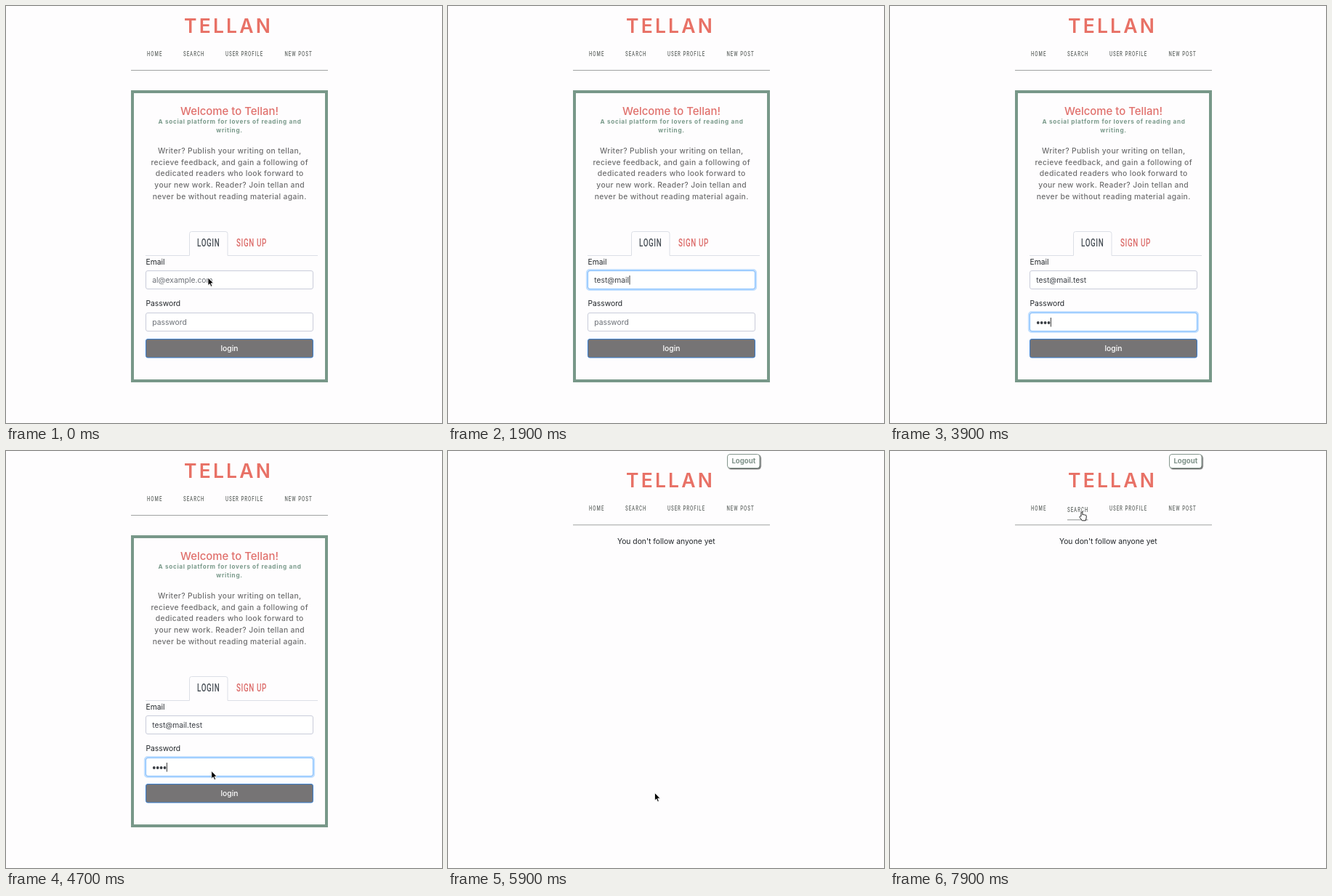
Recreate the animation shown at these times as an HTML page. Size 600 by 574 pixels, loop 8 s.

```html
<!DOCTYPE html>
<html lang="en">
<head>
<meta charset="utf-8">
<title>Tellan</title>
<style>
  html, body { margin: 0; width: 100%; height: 100%; overflow: hidden; background: #fefdfe; }
  svg { display: block; width: 600px; height: 574px; }
  text { font: 10.3px Inter, "Open Sans", sans-serif; fill: #212529; white-space: pre; }
  .mid { text-anchor: middle; }
  .brand { font-size: 26.5px; font-weight: 600; letter-spacing: 3.2px; fill: #e87166; }
  .narrow { font-family: Roboto, "Liberation Sans", sans-serif; font-weight: 500; }
  .link { font-size: 9px; letter-spacing: 1.45px; fill: #666b68; }
  .tab { font-size: 14.5px; letter-spacing: .9px; fill: #495057; }
  .title { font-size: 14.9px; font-weight: 500; fill: #e0706c; }
  .sub { font-size: 8.2px; font-weight: 700; letter-spacing: .7px; fill: #7a9a8b; }
  .intro { font-weight: 500; letter-spacing: .36px; fill: #6e6e6f; }
  .hint { fill: #6c7077; }
  .value { fill: #3a3e44; }
  .submit { font-weight: 500; fill: #fff; }
  .out { font-size: 9.6px; font-weight: 700; fill: #7d9188; }
  .box { fill: #fff; stroke: #c9ccda; }
  .ring { fill: none; stroke: #80bdff; }
  .glow { fill: none; stroke: #bfdeff; stroke-width: 2.2; }
  .rule { stroke: #a0a3a2; }
  .caret { stroke: #222; stroke-width: .9; }
</style>
</head>
<body>
<svg viewBox="0 0 600 574" xmlns="http://www.w3.org/2000/svg">
  <defs>
    <filter id="soft" x="-10%" y="-30%" width="120%" height="170%">
      <feDropShadow dx="0" dy="1" stdDeviation="1.2" flood-color="#000" flood-opacity=".35"/>
    </filter>
    <filter id="hard" x="-20%" y="-30%" width="140%" height="170%">
      <feDropShadow dx="1.3" dy="1.3" stdDeviation=".5" flood-color="#555" flood-opacity=".9"/>
    </filter>
  </defs>

  <g id="header">
    <text class="brand" x="245" y="37">TELLAN</text>
    <g id="links"></g>
    <path id="under" d="M244 81.5H272.500" stroke="#8d918f"/>
    <path class="rule" d="M172 88.5H443"/>
  </g>

  <g id="login">
    <rect x="174" y="118" width="267" height="398" fill="none" stroke="#789889" stroke-width="4"/>
    <text class="title mid" x="307.500" y="150.300">Welcome to Tellan!</text>
    <text class="sub mid" x="308" y="162.300">A social platform for lovers of reading and</text>
    <text class="sub mid" x="307.500" y="174.300">writing.</text>
    <g id="intro"></g>

    <path d="M192 343.500H252.500V313.500a3 3 0 0 1 3-3H302a3 3 0 0 1 3 3V343.500H429" fill="none" stroke="#dcdfe6"/>
    <g id="tabs"></g>

    <text x="192.500" y="355.500">Email</text>
    <text x="192.500" y="412.500">Password</text>
    <g id="email"></g>
    <g id="pass"></g>

    <rect x="192.500" y="458.500" width="230" height="25.500" rx="2.500" fill="#767475" stroke="#3a80d2"/>
    <g id="press">
      <rect class="glow" x="191" y="457" width="233" height="28.500" rx="4"/>
      <rect x="192.500" y="458.500" width="230" height="25.500" rx="2.500" fill="none" stroke="#2a7de0" stroke-width="1.300"/>
    </g>
    <text class="submit mid" x="307.500" y="475">login</text>

    <g id="menu">
      <rect x="192.500" y="391.500" width="230" height="39" rx="1.500" fill="#fff" filter="url(#soft)"/>
      <text x="201.500" y="415" style="font-size:10px;fill:#111">test</text>
    </g>
  </g>

  <g id="feed">
    <rect x="384.500" y="4.500" width="44.500" height="19" rx="3.500" fill="#fff" stroke="#84968d" filter="url(#hard)"/>
    <text class="out mid" x="406.800" y="17">Logout</text>
    <text x="233" y="127.700">You don't follow anyone yet</text>
  </g>

  <g id="cursor" stroke-linejoin="round">
    <path id="arrow" d="M0 0V10.500L2.400 8.400 4 12.200 5.800 11.400 4.200 7.700H7.500Z" fill="#000" stroke="#fff" stroke-width=".8"/>
    <path id="hand" transform="translate(-3.600 0)" fill="#fff" stroke="#111" stroke-width=".9"
      d="M2.600 6.600V1.300a1 1 0 0 1 2 0V4.400a1 1 0 0 1 1.800 .2a1 1 0 0 1 1.800 .4a.9 .9 0 0 1 1.600 .7V8.300L8.800 12.300H4L.8 8a1 1 0 0 1 1.800-1.400Z"/>
  </g>
</svg>
<script>
  const LOOP = 8000, FADE = 150;
  const FOCUS = 350, TAB = 2730, CLICK = 5180, ENTER = 5500;
  const ADDRESS = 'test@mail.test';
  const keyTimes = [...ADDRESS].map((_, i) => i ? 1000 + 120 * (i - 1) : 800);
  const dotTimes = [3000, 3200, 3400, 3600];

  // time, x, y of the pointer tip
  const path = [
    [0, 278, 374], [4200, 278, 374], [4500, 281, 410], [4900, 284.5, 470.5],
    [6500, 284.5, 470.5], [6600, 272, 355], [6750, 263, 235], [6900, 262, 175],
    [7100, 268, 152], [7350, 268, 152], [7600, 265, 108], [7800, 264, 83.5]
  ];

  const $ = id => document.getElementById(id);
  const show = (id, on) => $(id).style.display = on ? '' : 'none';
  const ramp = (t, start) => Math.min(1, Math.max(0, (t - start) / FADE));
  const count = (times, t) => times.filter(k => k <= t).length;

  const narrow = (cls, x, y, word, id = '') =>
    `<g id="${id}"><text class="narrow ${cls}" transform="translate(${x} ${y}) scale(.68 1)">${word}</text></g>`;

  $('links').innerHTML = narrow('link', 194, 69, 'HOME') + narrow('link', 244, 69, 'SEARCH', 'search') +
    narrow('link', 302, 69, 'USER PROFILE') + narrow('link', 383.5, 69, 'NEW POST');
  $('tabs').innerHTML = narrow('tab', 263, 330.7, 'LOGIN') +
    narrow('tab" style="fill:#dc6b69', 317, 330.7, 'SIGN UP');

  $('intro').innerHTML = [
    'Writer? Publish your writing on tellan,',
    'recieve feedback, and gain a following of',
    'dedicated readers who look forward to',
    'your new work. Reader? Join tellan and',
    'never be without reading material again.'
  ].map((s, i) => `<text class="intro mid" x="307.7" y="${202.7 + 15.8 * i}">${s}</text>`).join('');

  function field(id, y, hint) {
    const g = $(id);
    g.innerHTML = `
      <rect class="box" x="192.5" y="${y}" width="230" height="25" rx="2.5"/>
      <g class="focus">
        <rect class="glow" x="191" y="${y - 1.5}" width="233" height="28" rx="4"/>
        <rect class="ring" x="192.5" y="${y}" width="230" height="25" rx="2.5"/>
      </g>
      <text class="hint" x="201.3" y="${y + 16.5}">${hint}</text>
      <text class="value" x="201.3" y="${y + 16.5}"></text>
      <g class="dots"></g>
      <path class="caret" d="M0 ${y + 6.5}v12.5"/>`;
    const part = name => g.querySelector('.' + name);
    return { focus: part('focus'), hint: part('hint'), value: part('value'), dots: part('dots'), caret: part('caret') };
  }

  const email = field('email', 364.5, 'al@example.com');
  const pass = field('pass', 422.5, 'password');
  pass.dots.innerHTML = dotTimes.map((_, i) =>
    `<circle cx="${203.8 + 4.9 * i}" cy="436" r="1.9" fill="#3a3e44"/>`).join('');

  function setField(f, t, from, to, times, typed, width) {
    const n = count(times, t);
    const last = n ? times[n - 1] : from;
    const active = t >= from && t < to;
    f.focus.style.opacity = ramp(t, from) - ramp(t, to);
    f.hint.style.display = n ? 'none' : '';
    f.value.textContent = typed.slice(0, n);
    f.caret.style.display = active && (t - last) % 1060 < 530 ? '' : 'none';
    f.caret.setAttribute('transform', `translate(${201.8 + width(n)} 0)`);
  }

  function pointer(t) {
    let i = path.findIndex(p => p[0] > t);
    if (i < 0) return path[path.length - 1].slice(1);
    const [t0, x0, y0] = path[i - 1], [t1, x1, y1] = path[i];
    const k = (t - t0) / (t1 - t0);
    return [x0 + (x1 - x0) * k, y0 + (y1 - y0) * k];
  }

  function draw(t) {
    const inside = t >= ENTER;
    show('login', !inside);
    show('feed', inside);
    $('header').setAttribute('transform', `translate(0 ${inside ? 13.3 : 0})`);

    setField(email, t, FOCUS, TAB, keyTimes, ADDRESS, n => n ? email.value.getComputedTextLength() + .4 : 0);
    setField(pass, t, TAB, CLICK, dotTimes, '', n => 4.9 * n);
    [...pass.dots.children].forEach((d, i) => d.style.display = t >= dotTimes[i] ? '' : 'none');

    const typed = count(keyTimes, t);
    show('menu', typed > 0 && typed < 5);
    $('press').style.opacity = ramp(t, CLICK);

    const [x, y] = pointer(t);
    const onLink = inside && y < 97;
    const onButton = !inside && y > 458;
    show('cursor', t < 780 || t >= 4200);
    $('cursor').setAttribute('transform', `translate(${x} ${y})`);
    show('hand', onLink || onButton);
    show('arrow', !onLink && !onButton);
    $('search').setAttribute('transform', `translate(0 ${onLink ? 2 : 0})`);
    show('under', onLink);
  }

  const begin = performance.now();
  function tick() {
    draw((performance.now() - begin) % LOOP);
    requestAnimationFrame(tick);
  }
  tick();
</script>
</body>
</html>
```
